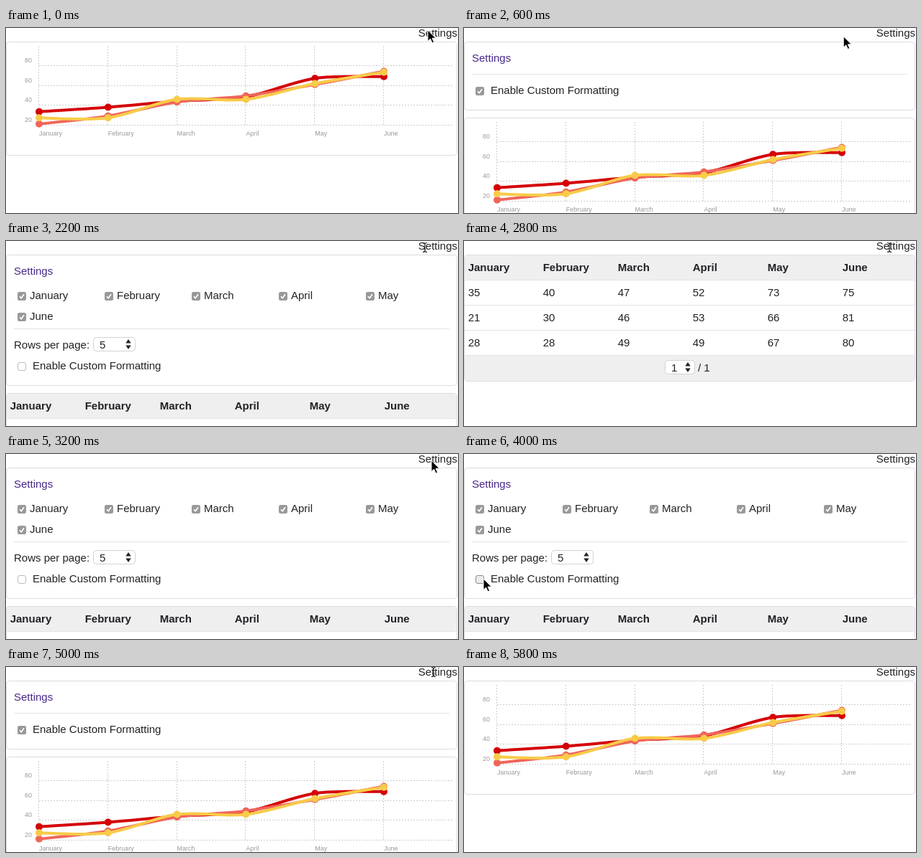
An HTML page that plays this animation: 628 by 258 pixels, repeating every 6 s.

```html
<!DOCTYPE html>
<html lang="en">
<head>
<meta charset="utf-8">
<style>
  html, body { margin: 0; height: 100%; overflow: hidden; background: #fff; }
  svg { display: block; font: 15px "Liberation Sans", Arial, sans-serif; fill: #212225; }
  .card { fill: #fff; stroke: #dcdcde; }
  .rule { stroke: #e4e4e6; }
  .shade { fill: #efeff0; }
  .title { fill: #48288a; }
  .head { font-weight: bold; }
  .label { font-size: 9px; fill: #999; }
  .grid { stroke: rgba(0, 0, 0, .2); stroke-dasharray: 2; }
  .line { fill: none; stroke-width: 4; }
  .select { fill: #fff; stroke: #d2d2d4; }
</style>
</head>
<body>
<svg id="stage" width="628" height="258" viewBox="0 0 628 258"></svg>
<script>
const months = ["January", "February", "March", "April", "May", "June"];
const rows = [
  [35, 40, 47, 52, 73, 75],
  [21, 30, 46, 53, 66, 81],
  [28, 28, 49, 49, 67, 80]
];
const colors = ["#d40206", "#f0655a", "#f8cb48"];
const LOOP = 6000, STEP = 200;

const text = (x, y, s, cls = "", anchor = "start") =>
  `<text x="${x}" y="${y}" class="${cls}" text-anchor="${anchor}">${s}</text>`;
const line = (x1, y1, x2, y2, cls) =>
  `<line x1="${x1}" y1="${y1}" x2="${x2}" y2="${y2}" class="${cls}"/>`;
const box = (x, y, w, h, cls, r = 4) =>
  `<rect x="${x}" y="${y}" width="${w}" height="${h}" rx="${r}" class="${cls}"/>`;
const group = (id, body) => `<g id="${id}">${body}</g>`;

function check(x, y, on, pressed) {
  if (!on) return `<rect x="${x + .5}" y="${y + .5}" width="11" height="11" rx="2.5"
    fill="${pressed ? "#ececec" : "#fff"}" stroke="${pressed ? "#8c8c8c" : "#bcbcbc"}"/>`;
  return `<rect x="${x}" y="${y}" width="12" height="12" rx="2.5" fill="${pressed ? "#757575" : "#999"}"/>
    <path d="M${x + 3} ${y + 6.3}l2.2 2.4 3.8-5.4" fill="none" stroke="#fff" stroke-width="1.7"/>`;
}

function select(x, y, w, h, value) {
  const ax = x + w - 9.5, m = y + h / 2;
  return box(x, y, w, h, "select") + text(x + 8.5, y + 15.5, value) +
    `<path d="M${ax - 3.7} ${m - 1.5}h7.4l-3.7-5.5zM${ax - 3.7} ${m + 1.5}h7.4l-3.7 5.5z"/>`;
}

// Catmull-Rom spline as cubic Béziers
function spline(p) {
  let d = `M${p[0]}`;
  for (let i = 0; i < p.length - 1; i++) {
    const a = p[i - 1] || p[i], b = p[i], c = p[i + 1], e = p[i + 2] || c;
    const c1 = b.map((v, k) => v + (c[k] - a[k]) / 6);
    const c2 = c.map((v, k) => v - (e[k] - b[k]) / 6);
    d += `C${c1} ${c2} ${c}`;
  }
  return d;
}

function chart() {
  const px = i => 46 + 95.8 * i, py = v => 135 - (v - 20) * 110 / 90;
  let s = box(.5, 19.5, 626, 158, "card");
  months.forEach((m, i) => {
    const x = Math.round(px(i)) - .5;
    s += line(x, 25, x, 135, "grid") + text(px(i), 150, m, "label");
  });
  [80, 60, 40, 20].forEach((v, i) => {
    const y = Math.floor(52.5 + 27.5 * i) + .5;
    s += line(46, y, 620, y, "grid") + text(36, y - 4.5, v, "label", "end");
  });
  rows.forEach((r, k) => {
    const pts = r.map((v, i) => [px(i), py(v)]);
    s += `<path class="line" stroke="${colors[k]}" d="${spline(pts)}"/>`;
    for (const [x, y] of pts) s += `<circle cx="${x}" cy="${y}" r="5" fill="${colors[k]}"/>`;
  });
  return s;
}

function table() {
  let s = box(.5, 19.5, 626, 176, "card") +
    box(1, 20, 625, 34, "shade", 3) + box(1, 160, 625, 35, "shade", 3);
  [54.5, 89.5, 124.5, 159.5].forEach(y => s += line(1, y, 626, y, "rule"));
  [months, ...rows].forEach((r, j) => r.forEach((v, i) =>
    s += text(5.7 + 104 * i, 42 + 35 * j, v, j ? "" : "head")));
  return s + select(279.5, 166.5, 41, 19, 1) + text(325, 182, "/ 1");
}

function settings(height, ruleY, formatY, body) {
  return box(.5, 19.5, 626, height, "card") + text(11, 47, "Settings", "title") +
    line(11, ruleY, 616, ruleY, "rule") + text(37, formatY, "Enable Custom Formatting") + body;
}

const monthChecks = months.map((m, i) => {
  const x = 16 + 121 * (i % 5), y = i < 5 ? 71 : 100;
  return check(x, y, true) + text(x + 17, y + 10, m);
}).join("");

const stage = document.getElementById("stage");
stage.innerHTML =
  text(627, 12, "Settings", "", "end") +
  group("chartPanel", settings(95, 64.5, 92, group("chartCheck", check(16, 82, true)))) +
  group("tablePanel", settings(182, 122.5, 179, monthChecks + text(11, 150, "Rows per page:") +
    select(121.5, 134.5, 58, 19, 5) + group("tableCheck", check(16, 169, false)))) +
  group("chart", chart()) + group("table", table()) +
  group("arrow", `<path d="M0 0V15.5l3.6-3.4 2.5 5.7 2.5-1.1-2.5-5.5h5z" fill="#000" stroke="#fff"/>`) +
  group("beam", `<path d="M-3-6.5q3 0 3 2v9q0 2-3 2M3-6.5q-3 0-3 2v9q0 2 3 2M-1.5 2h3"
    fill="none" stroke="#222" stroke-width="1.2"/>`);
const el = id => document.getElementById(id);
const show = (id, on) => el(id).style.display = on ? "" : "none";

// time, x, y, pointer shape from then on
const path = [
  [0, 586, 3, "arrow"], [400, 586, 3, "arrow"], [1400, 21, 86, "arrow"],
  [1800, 21, 86, "arrow"], [2200, 582, 9, "beam"], [2400, 582, 9, "beam"],
  [2800, 591, 9, "beam"], [3200, 591, 9, "arrow"], [3800, 27, 174, "arrow"],
  [4200, 27, 174, "arrow"], [4800, 594, 7, "beam"], [5200, 594, 7, "arrow"],
  [5400, 609, -8, "arrow"], [5600, 616, -9, "arrow"], [5800, 616, -9, "none"]
];

function pointer(t) {
  const i = path.findLastIndex(k => k[0] <= t);
  const a = path[i], b = path[i + 1] || a;
  const u = (t - a[0]) / (b[0] - a[0] || 1), e = u * u * (3 - 2 * u);
  return [a[1] + (b[1] - a[1]) * e, a[2] + (b[2] - a[2]) * e, a[3]];
}

function draw(t) {
  const within = (a, b) => t >= a && t < b;
  const open = within(400, 2600) || within(3200, 5200);
  const isTable = within(1800, 4200);
  show("chartPanel", open && !isTable);
  show("tablePanel", open && isTable);
  show("chart", !isTable);
  show("table", isTable);
  el("chart").setAttribute("transform", `translate(0 ${open ? 106 : 0})`);
  el("table").setAttribute("transform", `translate(0 ${open ? 193 : 0})`);
  el("chartCheck").innerHTML = check(16, 82, true, within(1600, 1800));
  el("tableCheck").innerHTML = check(16, 169, false, within(4000, 4200));
  const [x, y, kind] = pointer(t);
  for (const id of ["arrow", "beam"]) {
    show(id, id === kind);
    el(id).setAttribute("transform", `translate(${x} ${y})`);
  }
}

const start = performance.now();
function tick(now) {
  const t = Math.max(0, now - start) % LOOP;
  draw(Math.floor(t / STEP) * STEP);
  requestAnimationFrame(tick);
}
draw(0);
requestAnimationFrame(tick);
</script>
</body>
</html>
```
